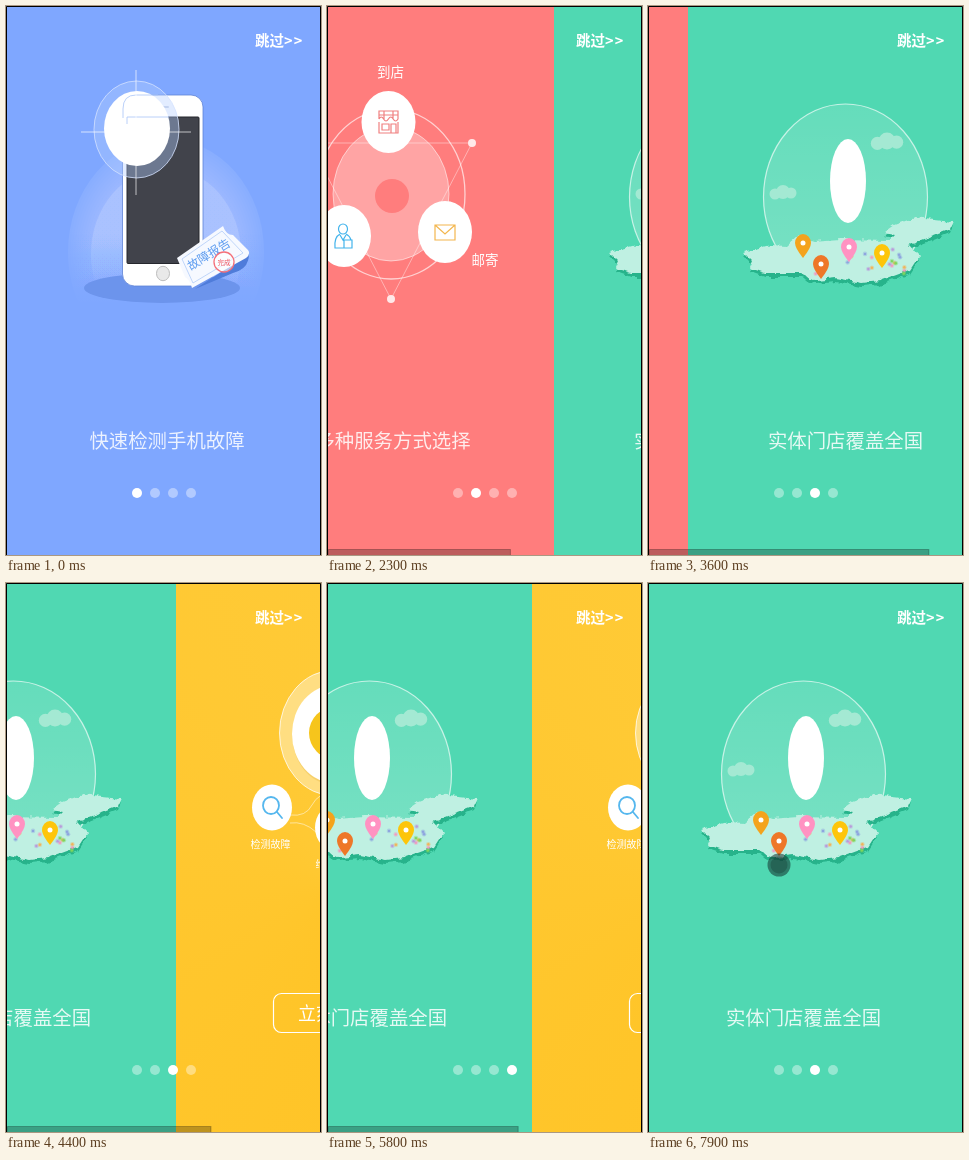
An HTML page that plays this animation: 315 px wide and 549 px high, repeating every 8 s.

```html
<!DOCTYPE html>
<html lang="zh-CN">
<head>
<meta charset="utf-8">
<title>引导页</title>
<style>
  html, body { margin: 0; width: 100%; height: 100%; overflow: hidden; background: #000; }
  #stage { position: relative; width: 315px; height: 549px; overflow: hidden; }
  .page { position: absolute; left: -2px; top: 0; width: 320px; height: 549px; }
  .page svg, #overlay { position: absolute; left: 0; top: 0; display: block; }
  #blue { background: #7fa7ff; }
  #red { background: #ff7d7d; }
  #green { background: #50d8b2; }
  #yellow { background: conic-gradient(at 161px 300px, #ffbc14, #ffc123 25%, #ffc529 55%, #ffca36); }
  text { font-family: "Noto Sans CJK SC", "Noto Sans CJK", sans-serif; fill: #fff; text-anchor: middle; }
  .title { font-size: 19.4px; font-weight: 300; fill-opacity: .85; }
  .label { font-size: 13.5px; }
  .small { font-size: 10px; }
  .skip { font-size: 14.5px; font-weight: 700; text-anchor: start; }
  .line { fill: none; stroke: #fff; }
</style>
</head>
<body>
<div id="stage">
  <div class="page" id="blue">
    <svg width="320" height="549" viewBox="-2 0 320 549">
      <defs>
        <linearGradient id="fade" x2="0" y2="1">
          <stop offset=".4" stop-color="#fff"/><stop offset=".74" stop-color="#fff" stop-opacity="0"/>
        </linearGradient>
      </defs>
      <g id="halo"></g>
      <ellipse cx="160" cy="248" rx="75" ry="86" fill="url(#fade)" opacity=".15"/>
      <ellipse cx="156" cy="282" rx="78" ry="15" fill="#6c94ec"/>
      <rect x="116.5" y="89" width="80.5" height="191" rx="12" fill="#fff" stroke="#5f83d6" stroke-width=".8"/>
      <rect x="121" y="111" width="72" height="146.5" rx="1" fill="#41434b" stroke="#25272d"/>
      <path d="M153 101h9" stroke="#cdd5e6" stroke-width="2" stroke-linecap="round"/>
      <ellipse cx="157" cy="267.5" rx="6.5" ry="7.2" fill="#e9e9e9" stroke="#bdbdbd"/>
      <ellipse cx="130.5" cy="123.5" rx="42.5" ry="48.5" fill="#b3ccff" fill-opacity=".38" stroke="#d5e2ff" stroke-width=".8"/>
      <ellipse cx="131" cy="122.5" rx="33" ry="37.5" fill="#fff"/>
      <path d="M117 112V103Q117 89 130 89H152M121 118V111H163" class="line" style="stroke:#a9c4f8" stroke-width=".8"/>
      <path d="M130 64V189M75 126H185" class="line" stroke-opacity=".75" stroke-width=".9"/>
      <path d="M189 283L227 267Q243 263 243 248Z" fill="#4f7cda"/>
      <path d="M171 252L217 220Q220 229 227 229L242 244Q245 248 240 252L186 282Q184 274 179 271Z" fill="#f6f9ff"/>
      <path d="M176 253L216 225 237 247 187 277Z" class="line" style="stroke:#a8c6f6" stroke-width=".7"/>
      <text transform="translate(205 252) rotate(-32)" font-size="12" style="fill:#5b9bf0">故障报告</text>
      <circle cx="218" cy="256" r="10" fill="#fff" fill-opacity=".6" stroke="#f4707a" stroke-width="1.3"/>
      <text x="218" y="258.5" font-size="6.5" style="fill:#ee4f5c">完成</text>
      <text class="title" x="161" y="442">快速检测手机故障</text>
    </svg>
  </div>

  <div class="page" id="red">
    <svg width="320" height="549" viewBox="-2 0 320 549">
      <ellipse cx="155" cy="188" rx="74" ry="85" class="line" stroke-opacity=".65" stroke-width="1.3"/>
      <ellipse cx="155" cy="188" rx="58" ry="67" fill="#fff" fill-opacity=".3" stroke="#fff" stroke-opacity=".5"/>
      <path d="M74 137H236L155 293Z" class="line" stroke-opacity=".4"/>
      <g fill="#ffe9e9"><circle cx="74" cy="137" r="4"/><circle cx="236" cy="137" r="4"/><circle cx="155" cy="293" r="4"/></g>
      <circle cx="156" cy="190" r="17" fill="#ff7d7d"/>
      <g fill="#fff">
        <ellipse cx="152.5" cy="116" rx="27" ry="31"/>
        <ellipse cx="108" cy="230" rx="27" ry="31"/>
        <ellipse cx="209" cy="226" rx="27" ry="31"/>
      </g>
      <g fill="none" stroke-width="1.2">
        <path d="M143 105h19v8q-2.4 4-4.8 0t-4.8 0t-4.8 0t-4.6 0zM143 109h19M148 105v8M157 105v8M143 116v11h19v-11M146 118h7v6h-7zM155 127v-9h5v9" stroke="#f08080"/>
        <path d="M104 228q-6 3-5 14h10M110 228q4 2 5 6M108 234h8v8h-8zM104 229l3 5 3-5" stroke="#43b4ec"/>
        <ellipse cx="107" cy="223" rx="4.5" ry="5" stroke="#43b4ec"/>
        <path d="M199 219h20v15h-20zl10 9 10-9" stroke="#f3b64e"/>
      </g>
      <text class="label" x="154.5" y="71">到店</text>
      <text class="label" x="61.5" y="258.5">上门</text>
      <text class="label" x="249" y="258.5">邮寄</text>
      <text class="title" x="157" y="442">多种服务方式选择</text>
    </svg>
  </div>

  <div class="page" id="green">
    <svg width="320" height="549" viewBox="-2 0 320 549">
      <defs>
        <linearGradient id="bubble" x2="0" y2="1">
          <stop stop-color="#fff" stop-opacity=".12"/><stop offset="1" stop-color="#fff" stop-opacity=".24"/>
        </linearGradient>
        <clipPath id="sky"><path d="M0 0H320V252H0Z"/></clipPath>
        <filter id="rough" x="-5%" y="-10%" width="110%" height="120%" color-interpolation-filters="sRGB">
          <feTurbulence type="fractalNoise" baseFrequency=".13" numOctaves="2" seed="4"/>
          <feDisplacementMap in="SourceGraphic" scale="7" xChannelSelector="R" yChannelSelector="G"/>
        </filter>
        <path id="land" d="M54 246L80 239 97 240 108 230 124 235 150 233 199 234 205 228 194 226 204 219 224 212 263 216 260 223 219 239 229 250 220 264 190 275 172 277 145 272 126 274 110 267 75 267 60 262 63 255Z"/>
        <g id="cloud"><circle cx="-8" cy="2" r="5.5"/><circle r="7"/><circle cx="8" cy="1" r="5.5"/></g>
      </defs>
      <ellipse cx="155.5" cy="191" rx="82" ry="93" clip-path="url(#sky)" fill="url(#bubble)" stroke="#fff" stroke-opacity=".65" stroke-width="1.2"/>
      <g fill="#a4e9d3"><use href="#cloud" x="93" y="186"/><use href="#cloud" transform="translate(197 135) scale(1.2)"/></g>
      <ellipse cx="158" cy="175" rx="18" ry="42" fill="#fff"/>
      <g filter="url(#rough)"><use href="#land" y="4" fill="#27b38b"/><use href="#land" fill="#bff0e2"/></g>
      <g id="towns"></g>
      <g id="pins"></g>
      <text class="title" x="155.5" y="442">实体门店覆盖全国</text>
    </svg>
  </div>

  <div class="page" id="yellow">
    <svg width="320" height="549" viewBox="-2 0 320 549">
      <ellipse cx="156.5" cy="150" rx="55" ry="63" fill="#fff" fill-opacity=".38" stroke="#fff" stroke-opacity=".75"/>
      <ellipse cx="156.5" cy="153" rx="42" ry="49" fill="#dba424" fill-opacity=".25"/>
      <ellipse cx="156.5" cy="151" rx="42.5" ry="49" fill="#fff"/>
      <circle cx="157" cy="150" r="26" fill="#f6c51c"/>
      <path d="M112 232Q128 234 134 222T157 208M112 240Q126 238 138 249M202 232Q186 234 180 222T157 208M202 240Q188 238 176 249" class="line" stroke-opacity=".5"/>
      <g fill="#fff">
        <ellipse cx="94" cy="224.5" rx="20" ry="23"/>
        <ellipse cx="157" cy="244.5" rx="20" ry="23"/>
        <ellipse cx="220" cy="224.5" rx="20" ry="23"/>
      </g>
      <g fill="none" stroke-width="1.8" stroke-linecap="round" stroke-linejoin="round">
        <path d="M99 229l5 6" stroke="#55b7ee"/><ellipse cx="93" cy="222.5" rx="8" ry="8.5" stroke="#55b7ee"/>
        <path d="M148 251l9-10q-2-8 6-8l-3 5 3 4 4-5q1 9-7 8l-8 10q-4 1-4-4z" stroke="#ee9c28"/>
        <path d="M212 213h16v16l-6 6h-5q-5 0-5-5zM228 229h-6v6M216 219h8M216 223h8M216 227h6" stroke="#8dcc45"/>
      </g>
      <text class="small" x="92.5" y="265">检测故障</text>
      <text class="small" x="157.5" y="285">维修方案</text>
      <text class="small" x="223" y="265">提交订单</text>
      <rect x="95.5" y="410.5" width="122" height="39" rx="8" class="line" stroke-width="1.2"/>
      <text x="156" y="437" font-size="18">立刻体验</text>
    </svg>
  </div>

  <svg id="overlay" width="315" height="549">
    <text class="skip" x="249" y="40">跳过<tspan letter-spacing="1.2">&gt;&gt;</tspan></text>
    <g id="dots"></g>
    <rect id="thumb" x="1.5" y="543.5" height="6" fill="#000" fill-opacity=".26" stroke="#000" stroke-opacity=".25"/>
    <g id="touch" fill="#12302c"><circle r="11.5" fill-opacity=".55"/><circle r="8.5" fill-opacity=".3"/></g>
    <path d="M.5 549V.5H314.5V549" fill="none" stroke="#000"/>
  </svg>
</div>

<script>
const LOOP = 8000, STEP = 100, PITCH = 320, VIEW = 313;
const PEEK = 60;          // how far a page is pulled aside before it springs back
const RELEASE = 0.65;     // part of a swipe after which the dot changes

const swipes = [
  { start: 1000, end: 1800, from: 0, to: 1, power: 0.94 },
  { start: 2100, end: 2800, from: 1, to: 2, power: 1 },
  { start: 3000, end: 3800, from: 2, to: 2 },
  { start: 4300, end: 4900, from: 2, to: 3, power: 3.4 },
  { start: 5000, end: 5400, from: 3, to: 3 },
  { start: 5600, end: 6000, from: 3, to: 2, power: 1.5 }
];

const byId = id => document.getElementById(id);
const pages = [...document.querySelectorAll('.page')];
const range = count => [...Array(count).keys()];
const clamp = u => Math.min(1, Math.max(0, u));
const mix = (a, b, u) => a + (b - a) * u;
const bend = (a, b, c, u) => mix(mix(a, b, u), mix(b, c, u), u);

let seed = 7;
const random = () => (seed = seed * 16807 % 2147483647) / 2147483647;

byId('halo').innerHTML = range(10).map(i =>
  `<ellipse cx="160" cy="246" rx="${98 - i * 2.5}" ry="${113 - i * 2.9}" fill="url(#fade)" opacity="${i ? 0.018 : 0.08}"/>`
).join('');

const townColors = ['#f39ac0', '#8ea5df', '#f1b45b', '#b99adb', '#7fd65d'];
byId('towns').innerHTML = range(18).map(i => {
  const x = mix(125, 218, Math.sqrt(random())), y = mix(242, 270, random());
  return `<g fill="${townColors[i % 5]}" transform="translate(${x} ${y})">
    <circle r="2.3" opacity=".4"/><circle r="1.2"/></g>`;
}).join('');

const pin = (x, y, color) => `<g transform="translate(${x} ${y})">
  <path d="M0 15Q-8 5-8 0A8 9 0 0 1 8 0Q8 5 0 15Z" fill="${color}"/><circle r="2.5" fill="#fff"/></g>`;
byId('pins').innerHTML = pin(113, 237, '#f4a31c') + pin(131, 258, '#ee7728')
  + pin(159, 241, '#ff92c2') + pin(192, 247, '#fdc50b');

byId('dots').innerHTML = range(4).map(i => `<circle cx="${131 + i * 18}" cy="487" r="5" fill="#fff"/>`).join('');
const dots = [...byId('dots').children];

function swipeState(t) {
  const swipe = swipes.findLast(s => t >= s.start) || swipes[0];
  const { start, end, from, to, power } = swipe;
  const u = clamp((t - start) / (end - start));
  const scroll = from === to
    ? from * PITCH - PEEK * Math.sin(Math.PI * u)
    : mix(from, to, 1 - (1 - u) ** power) * PITCH;
  return { scroll, active: u > RELEASE ? to : from };
}

// A wide arc across the page, then a short slide to the left.
function touchPoint(t) {
  const arc = clamp((t - 6800) / 800), slide = clamp((t - 7600) / 300);
  return [bend(298, -150, 159, arc) - 28 * slide, bend(50.5, 200, 279.5, arc) + 2.5 * slide];
}

function draw(now) {
  const t = Math.floor(now % LOOP / STEP) * STEP;
  const { scroll, active } = swipeState(t);
  pages.forEach((page, i) => page.style.transform = `translateX(${Math.round(i * PITCH - scroll)}px)`);
  dots.forEach((dot, i) => dot.setAttribute('fill-opacity', i === active ? 1 : 0.4));

  // The scrollbar shrinks with the overflow of the page on the right.
  const overflow = Math.ceil(scroll / PITCH) * PITCH - scroll;
  byId('thumb').setAttribute('width', Math.min(VIEW, VIEW * VIEW / (307 + overflow)) - 1);
  byId('thumb').style.display = overflow > 0.5 ? '' : 'none';

  byId('touch').style.display = t >= 6800 ? '' : 'none';
  byId('touch').setAttribute('transform', `translate(${touchPoint(t)})`);
}

const start = performance.now();
function tick() {
  draw(performance.now() - start);
  requestAnimationFrame(tick);
}
tick();
</script>
</body>
</html>
```
